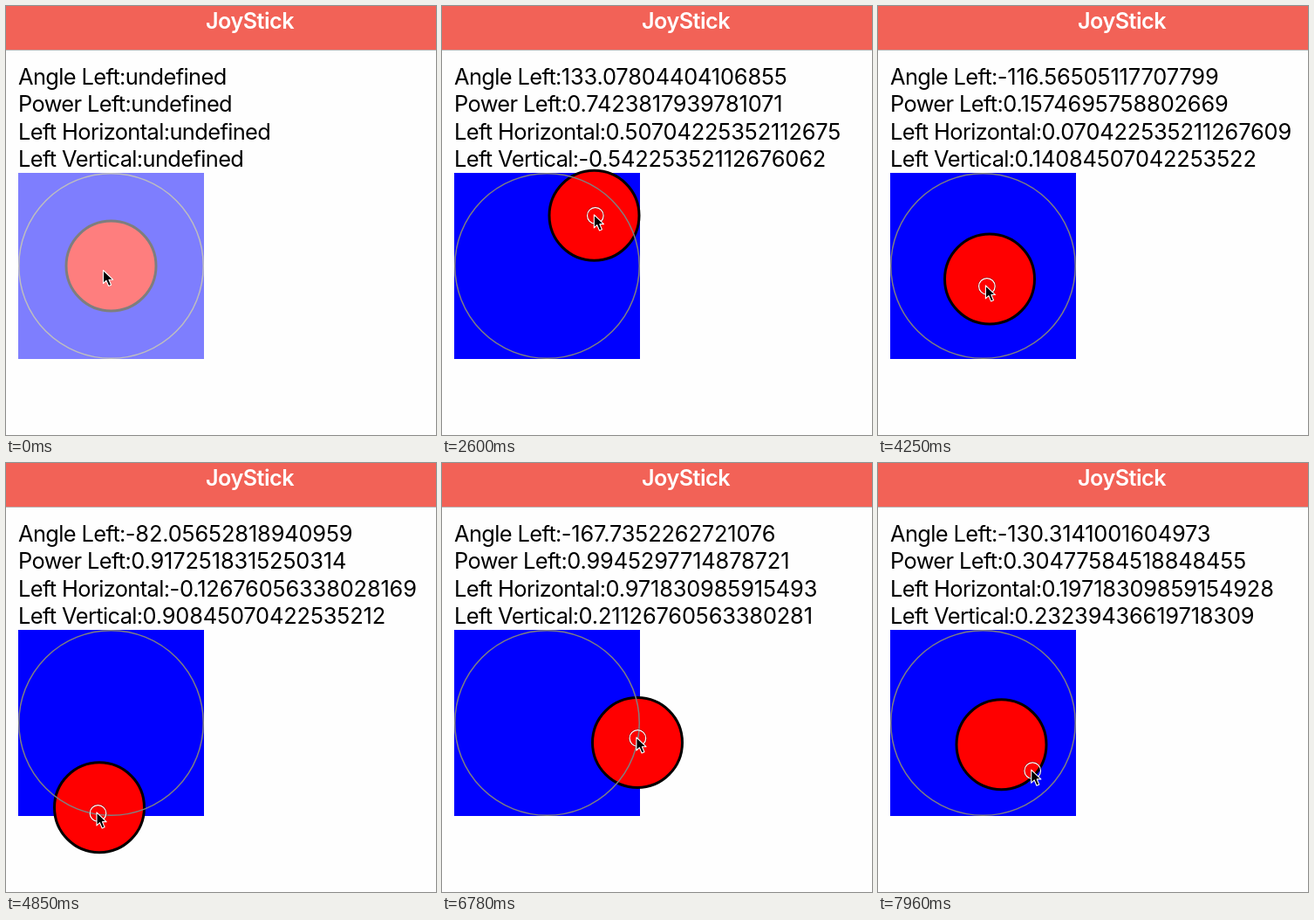
These frames come from a looping animation (493x491 px, 8000 ms). An HTML page:

```html
<!DOCTYPE html>
<html lang="en">
<head>
<meta charset="utf-8">
<title>JoyStick</title>
<style>
  html, body { margin: 0; width: 100%; height: 100%; overflow: hidden; background: #fefefe; }
  svg { display: block; width: 493px; height: 491px; }
  text { font: 25.4px Inter, Roboto, sans-serif; letter-spacing: -0.024em; }
  .live tspan { letter-spacing: -0.006em; }
  .title { font-size: 25.2px; font-weight: 600; letter-spacing: -0.02em; fill: #fff; text-anchor: middle; }
</style>
</head>
<body>
<svg viewBox="0 0 493 491">
  <rect width="493" height="491" fill="#fefefe"/>
  <rect width="493" height="50" fill="#f26257"/>
  <rect y="50" width="493" height="1" fill="#b8b2b2"/>
  <text class="title" x="279.5" y="26">JoyStick</text>
  <g id="readout">
    <text x="14" y="90">Angle Left:<tspan></tspan></text>
    <text x="14" y="121.4">Power Left:<tspan></tspan></text>
    <text x="14" y="152.8">Left Horizontal:<tspan></tspan></text>
    <text x="14" y="184.2">Left Vertical:<tspan></tspan></text>
  </g>
  <g id="stick">
    <rect x="14" y="191" width="213" height="213" fill="#00f"/>
    <circle id="knob" r="51.5" fill="#f00" stroke="#000" stroke-width="3"/>
    <circle cx="120.5" cy="297.5" r="105.75" fill="none" stroke="#808080" stroke-width="1.5"/>
  </g>
  <g id="pointer">
    <g id="ring" fill="none">
      <circle r="9.6" stroke="#000" stroke-opacity="0.35" stroke-width="2"/>
      <circle r="9.3" stroke="#fff" stroke-width="1.2"/>
    </g>
    <path d="M-1.5-1V14L2 10.7 4.7 17 7.6 15.8 5 9.7H9.6z"
      fill="#000" stroke="#fff" stroke-width="1.1" stroke-linejoin="round"/>
  </g>
</svg>
<script>
const LOOP = 8000, PRESS = 800, PAUSE = 5150, RESUME = 5450;
const CENTER = { x: 120.5, y: 297.5 };
const RANGE = 142, SCALE = 0.75; // stick travel in points, pixels per point
const LOOK_AHEAD = 60;           // the knob trails the pointer by this many ms

// Turning points of the drag: time, then offset from the centre in points
const path = [
  [800, 0, 0], [1400, -103, -32], [1850, -86, -88], [2600, 72, -77],
  [3350, -1, -78], [3650, 19, -71], [3800, 59, -64], [4250, 10, 20],
  [4850, -18, 129], [5100, -18, 150], [6780, 138, 30], [7500, 55, -84],
  [7810, 7, -40], [7960, 28, 33], [8100, 160, 133]
];

const byId = id => document.getElementById(id);
const readout = byId('readout'), values = readout.querySelectorAll('tspan');
const stick = byId('stick'), knob = byId('knob');
const pointer = byId('pointer'), ring = byId('ring');

// The screen refreshes in coarse steps, with one pause
function refreshTime(t) {
  const snap = (from, step) => from + step * Math.floor((t - from) / step);
  return t < RESUME ? Math.min(PAUSE, snap(PRESS, 150)) : snap(RESUME, 147.6);
}

// Smooth curve through the turning points
function dragAt(t) {
  const last = path.length - 1;
  const i = Math.max(1, path.findIndex(p => p[0] >= t));
  const a = path[i - 1], b = path[i];
  const span = b[0] - a[0], u = (t - a[0]) / span;
  const slope = (k, axis) => {
    const p = path[Math.max(0, k - 1)], q = path[Math.min(last, k + 1)];
    return (q[axis] - p[axis]) / (q[0] - p[0]);
  };
  const along = axis => {
    const ease = u * u * (3 - 2 * u);
    return a[axis] + (b[axis] - a[axis]) * ease + span * u * (1 - u) *
      (slope(i - 1, axis) * (1 - u) - slope(i, axis) * u);
  };
  return { x: along(1), y: along(2) };
}

function clampToRange(p) {
  const x = Math.round(p.x), y = Math.round(p.y);
  const k = Math.max(1, Math.hypot(x, y) / RANGE);
  return { x: x / k, y: y / k };
}

// Fifteen digits where they are exact, otherwise seventeen
function longNumber(n) {
  return +n.toPrecision(15) === n ? String(n) : n.toPrecision(17);
}

const place = (el, x, y) => el.setAttribute('transform', `translate(${x} ${y})`);
const toScreen = p => [CENTER.x + p.x * SCALE, CENTER.y + p.y * SCALE];
const show = list => values.forEach((el, i) => { el.textContent = list[i]; });

function render(t) {
  const pressed = t >= PRESS;
  readout.classList.toggle('live', pressed);
  stick.setAttribute('opacity', pressed ? 1 : 0.5);
  ring.setAttribute('visibility', pressed ? 'visible' : 'hidden');
  if (!pressed) {
    show(Array(4).fill('undefined'));
    place(knob, CENTER.x, CENTER.y);
    place(pointer, 113, t < 500 ? 303.5 : 305);
    return;
  }
  const now = refreshTime(t);
  const p = clampToRange(dragAt(now));
  const h = p.x / RANGE, v = p.y / RANGE;
  show([
    Math.atan2(-v, -h) * (180 / Math.PI),
    Math.min(1, Math.sqrt(h * h + v * v)),
    longNumber(h),
    longNumber(v)
  ]);
  place(knob, ...toScreen(p));
  place(pointer, ...toScreen(dragAt(now + LOOK_AHEAD)));
}

const start = performance.now();
function frame() {
  render((performance.now() - start) % LOOP);
  requestAnimationFrame(frame);
}
frame();
</script>
</body>
</html>
```
